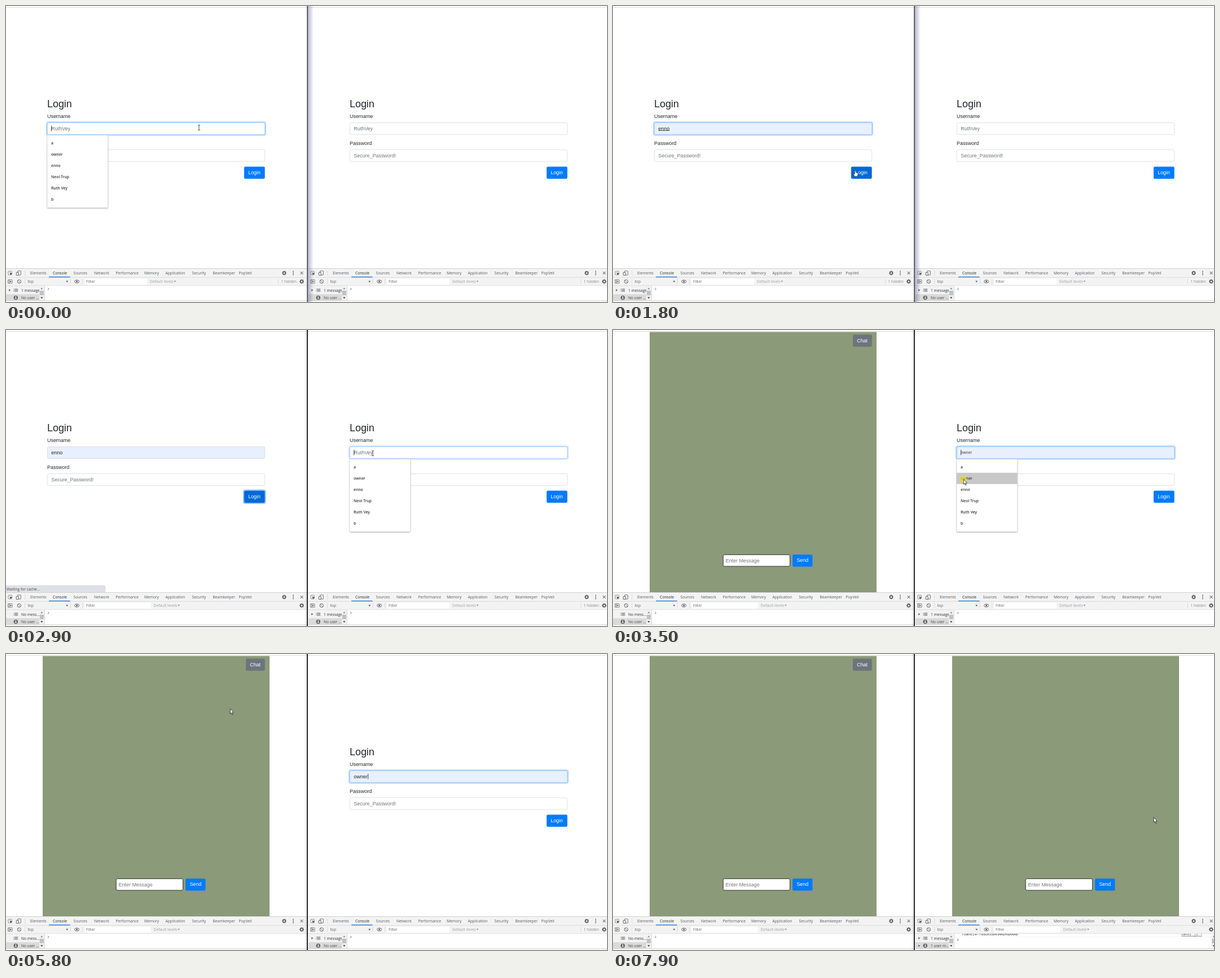
Animation of 1065 by 526 pixels, one loop 8000 ms. Source, as an HTML page with a canvas:

```html
<!DOCTYPE html>
<html lang="en">
<head>
<meta charset="utf-8">
<title>Two login windows</title>
<style>
html, body { margin: 0; width: 100%; height: 100%; overflow: hidden; background: #fff; }
canvas { display: block; width: 1065px; height: 526px; }
</style>
</head>
<body>
<canvas id="stage" width="1065" height="526"></canvas>
<script>
const ctx = document.getElementById('stage').getContext('2d');
const LOOP = 8000, STEP = 100, SHIFT = 536;
const PAGE = '"Liberation Sans", Arial, sans-serif';
const UI = '"Open Sans", "Noto Sans", sans-serif';
const MONO = '"Noto Sans Mono", "DejaVu Sans Mono", monospace';
const USERS = ['a', 'owner', 'enno', 'Neol Trup', 'Ruth Vey', 'b'];
const TABS = [['Elements', 43], ['Console', 83], ['Sources', 119.5], ['Network', 156],
  ['Performance', 194.5], ['Memory', 245], ['Application', 282.5], ['Security', 329.5],
  ['Beamkeeper', 366.5], ['PopVeil', 412.5]];
// time, x, y of the pointer
const PATH = [[0, 342, 216], [200, 342, 216], [800, 95, 284], [1200, 95, 284], [1700, 429, 292],
  [2000, 429, 292], [2600, 672, 218], [2700, 672, 218], [2800, 652, 217], [2900, 650, 219],
  [3300, 621, 265], [3700, 621, 265], [4100, 698, 225], [4500, 624, 200], [4800, 400, 60],
  [5100, 122, 22], [5400, 140, 1], [5800, 397, 97], [6300, 956, 294], [6500, 964, 293],
  [7300, 964, 293], [7500, 958, 290], [8000, 958, 290]];
const CLICKS = [1000, 1900, 2700, 3500, 6700];

const clamp = v => Math.max(0, Math.min(1, v));
const inside = (p, x, y, w, h) => p.x >= x && p.x < x + w && p.y >= y && p.y < y + h;

function pointerAt(t) {
  const i = Math.max(1, PATH.findIndex(k => k[0] >= t));
  const [t0, x0, y0] = PATH[i - 1], [t1, x1, y1] = PATH[i];
  const k = clamp((t - t0) / (t1 - t0));
  return { x: x0 + (x1 - x0) * k, y: y0 + (y1 - y0) * k };
}

function rect(x, y, w, h, color) {
  ctx.fillStyle = color;
  ctx.fillRect(x, y, w, h);
}

function box(x, y, w, h, r, fill, stroke, lw = 0.7) {
  ctx.beginPath();
  ctx.roundRect(x, y, w, h, r);
  if (fill) { ctx.fillStyle = fill; ctx.fill(); }
  if (stroke) { ctx.strokeStyle = stroke; ctx.lineWidth = lw; ctx.stroke(); }
}

function text(str, x, y, size, color, family = PAGE, weight = 400) {
  ctx.font = `${weight} ${size}px ${family}`;
  ctx.fillStyle = color;
  ctx.fillText(str, x, y);
}

const label = (str, x, y, color = '#555a60') => text(str, x, y, 6.7, color, UI);

function poly(pts, fill, stroke, lw = 0.8) {
  ctx.beginPath();
  for (let i = 0; i < pts.length; i += 2) ctx.lineTo(pts[i], pts[i + 1]);
  if (fill) { ctx.closePath(); ctx.fillStyle = fill; ctx.fill(); }
  if (stroke) { ctx.strokeStyle = stroke; ctx.lineWidth = lw; ctx.stroke(); }
}

function circle(x, y, r, fill, stroke, lw = 0.9) {
  ctx.beginPath();
  ctx.arc(x, y, r, 0, Math.PI * 2);
  if (fill) { ctx.fillStyle = fill; ctx.fill(); }
  if (stroke) { ctx.strokeStyle = stroke; ctx.lineWidth = lw; ctx.stroke(); }
}

function triangle(x, y, r, color, dir) {
  if (dir === 'right') poly([x - r * 0.7, y - r, x + r, y, x - r * 0.7, y + r], color);
  else poly([x - r, y - r * 0.6 * dir, x + r, y - r * 0.6 * dir, x, y + r * 0.8 * dir], color);
}

function gear(x, y) {
  circle(x, y, 2.3, null, '#555', 1.5);
  for (let i = 0; i < 8; i++) {
    const c = Math.cos(i * Math.PI / 4), s = Math.sin(i * Math.PI / 4);
    poly([x + c * 2.6, y + s * 2.6, x + c * 4, y + s * 4], null, '#555', 1.2);
  }
}

function button(str, x, y, w, color, ring) {
  if (ring) box(x - 1, y - 1, w + 2, 23.5, 3, null, 'rgba(60,150,255,.55)', 2);
  box(x, y, w, 21.5, 2.2, color);
  text(str, x + 7.2, y + 13.5, 8.94, '#fff');
}

function field(y, value, hint, focus, filled) {
  if (focus > 0) box(72, y - 1, 388, 23.2, 3, null, `rgba(0,123,255,${0.3 * focus})`, 2);
  box(73.3, y + 0.3, 385.4, 20.8, 2.2, filled ? '#e8f0fe' : '#fff',
    focus >= 0 ? '#80bdff' : '#ced4da');
  text(value || hint, 80.3, y + 13.4, 8.94, value ? '#212529' : '#6c757d');
}

function dropdown(hover) {
  ctx.save();
  ctx.shadowColor = 'rgba(0,0,0,.35)';
  ctx.shadowBlur = 2.5;
  ctx.shadowOffsetY = 1;
  box(73, 229.5, 107.5, 129, 1, '#fff');
  ctx.restore();
  box(73, 229.5, 107.5, 129, 1, null, '#d0d0d0', 0.5);
  if (hover >= 0) rect(73, 253.7 + (hover - 1) * 20, 107.5, 20, '#c8c8c8');
  USERS.forEach((u, i) => text(u, 80, 246.4 + i * 20, 6.8, '#333', UI, 600));
}

// focus is -1 when blurred, otherwise the strength of the ring
function login(s) {
  text('Login', 73, 180.3, 17.9, '#212529');
  text('Username', 73, 199, 8.94, '#212529');
  text('Password', 73, 247, 8.94, '#212529');
  if (s.preview) {
    field(207.2, ' ', '', s.focus, true);
    text(s.preview, 80.3, 220, 6.8, '#333', UI, 500);
  } else field(207.2, s.value, 'RuthVey', s.focus, s.value);
  if (s.underline) rect(80.3, 221.3, 20, 0.7, '#333');
  if (s.caret) rect(80.3 + (s.value ? 25 : 0), 212.8, 0.8, 9.6, '#222');
  field(255.2, '', 'Secure_Password!', -1, false);
  button('Login', 422, 285.4, 36.7, s.dark ? '#0069d9' : '#007bff', s.ring);
  if (s.open) dropdown(s.hover);
}

function chat(hasButton) {
  rect(65, 3.5, 402, 463, '#8b9a78');
  if (hasButton) button('Chat', 425, 8.2, 33.7, '#6c757d');
  box(195.2, 399.3, 118.4, 20.6, 2.4, '#fff', '#333', 1);
  text('Enter Message', 199.6, 412.7, 8.94, '#757575');
  button('Send', 318.2, 398.9, 35.3, '#007bff');
}

function scrollBar(x) {
  rect(x, 497.5, 9, 26, '#f1f1f1');
  triangle(x + 4.3, 502, 2, '#888', -1);
  rect(x + 0.8, 506, 7.2, 8, '#c1c1c1');
  triangle(x + 4.3, 518.5, 2.2, '#444', 1);
}

// log: 'hidden', 'empty' or 'user'
function devtools(log) {
  rect(0, 466, 536, 60, '#f3f3f3');
  rect(0, 466, 536, 0.8, '#c8c8c8');
  rect(0, 481.8, 536, 0.7, '#d0d0d0');
  rect(0, 496.6, 536, 0.7, '#d0d0d0');
  rect(69, 497.3, 467, 26, '#fff');
  TABS.forEach(([name, x], i) => label(name, x, 477, i === 1 ? '#222' : '#555a60'));
  rect(76, 480.9, 37.5, 1.3, '#1a73e8');

  box(4, 471.3, 6.4, 6.4, 0.8, null, '#666');
  poly([6.4, 473.4, 11.4, 475.5, 9.2, 476.3, 8.3, 478.6], '#444');
  box(20.7, 470.8, 5.6, 7.3, 0.5, null, '#666', 0.9);
  box(18.2, 473.4, 4, 5.2, 0.5, '#f3f3f3', '#555', 0.9);
  [33.5, 135.5].forEach(x => rect(x, 485, 0.6, 9, '#ccc'));
  rect(33.5, 470, 0.6, 9, '#ccc');
  rect(114, 485, 0.6, 9, '#ccc');
  gear(493, 474.5);
  [-3, 0, 3].forEach(d => circle(509, 474.5 + d, 0.9, '#555'));
  poly([521.6, 472, 526.6, 477], null, '#444', 1);
  poly([526.6, 472, 521.6, 477], null, '#444', 1);

  box(3.6, 486.4, 7.4, 6.4, 0.5, null, '#555');
  rect(5.4, 486.4, 0.8, 6.4, '#555');
  triangle(8.3, 489.6, 1.7, '#555', 'right');
  circle(23.3, 489.6, 3.2, null, '#555');
  poly([21.1, 487.4, 25.5, 491.8], null, '#555');
  label('top', 38.5, 492);
  triangle(108.2, 489.6, 2, '#555', 1);
  ctx.beginPath();
  ctx.ellipse(125.6, 489.6, 4, 2.7, 0, 0, Math.PI * 2);
  ctx.strokeStyle = '#555';
  ctx.lineWidth = 0.9;
  ctx.stroke();
  circle(125.6, 489.6, 1.4, '#444');
  const hidden = log === 'hidden', dx = hidden ? 0 : 6.5;
  rect(139, 484.5, 111 + dx, 10.5, '#fff');
  label('Filter', 142, 492, '#666');
  label('Default levels', 255 + dx, 492, '#a0a0a0');
  triangle(299.5 + dx, 489.4, 2, '#999', 1);
  if (hidden) {
    rect(482, 485, 0.6, 9, '#ccc');
    label('1 hidden', 487.5, 492, '#8a8a8a');
  }
  gear(524, 489.6);

  const user = log === 'user';
  rect(0, 512.2, 59, 11.3, '#dadada');
  if (log !== 'empty') triangle(6.5, 505, 2, '#666', 'right');
  if (user) triangle(6.5, 518.5, 2, '#666', 'right');
  [-2, 0, 2].forEach(d => {
    rect(13.5, 504.6 + d, 1, 0.9, '#555');
    rect(15.2, 504.6 + d, 6, 0.9, '#555');
  });
  label(log === 'empty' ? 'No mess...' : '1 message', 27, 507.6, '#333');
  circle(17.3, 518.4, 3.6, '#555');
  circle(17.3, 517.2, 1.2, '#eee');
  rect(15.4, 519.2, 3.8, 1.4, '#eee');
  label(user ? '1 user m...' : 'No user ...', 27, 521, '#444');
  scrollBar(59);
  rect(68.4, 497, 0.6, 26.5, '#ccc');

  if (user) {
    ctx.save();
    ctx.beginPath();
    ctx.rect(69, 497.3, 467, 26);
    ctx.clip();
    text('/owner#-Y0aoKeBAhMADHGAAAB', 82, 500, 6.4, '#333', MONO);
    text('owner.js:7', 471, 500, 6.2, '#555', MONO);
    rect(471, 501, 37, 0.6, '#555');
    rect(69, 502.6, 456, 0.5, '#eee');
    scrollBar(524.5);
    ctx.restore();
  }
  const py = user ? 508 : 502.8;
  poly([74.2, py - 1.9, 76.2, py, 74.2, py + 1.9], null, user ? '#666' : '#3b78e7', 1);
  rect(0, 523.3, 536, 0.8, '#ccc');
  rect(0, 524.1, 536, 2, '#fafafa');
}

function panel(x, w, dx, draw) {
  ctx.save();
  ctx.beginPath();
  ctx.rect(x, 0, w, 526);
  ctx.clip();
  ctx.translate(dx, 0);
  rect(-2, 0, 540, 526, '#fff');
  rect(-2, 2, 540, 1, '#dedede');
  draw();
  ctx.restore();
}

function status() {
  box(-3, 454.3, 178.7, 14, 2, '#dee1e6', '#c8cbd0', 0.6);
  label('Waiting for cache...', 1, 463, '#444');
}

function divider(leftActive) {
  const from = leftActive ? 535 : 533, to = leftActive ? 545 : 529;
  const g = ctx.createLinearGradient(from, 0, to, 0);
  g.addColorStop(0, leftActive ? 'rgba(70,80,115,.4)' : 'rgba(0,0,0,.15)');
  g.addColorStop(1, 'rgba(70,80,115,0)');
  rect(Math.min(from, to), 0, Math.abs(to - from), 526, g);
  rect(533.2, 0, 1.8, 526, leftActive ? '#4b5064' : '#15161c');
}

function pointer(p, kind) {
  ctx.save();
  ctx.translate(p.x, p.y);
  if (kind === 'beam') {
    poly([-2, -4.6, 0, -4, 2, -4.6], null, '#222');
    poly([0, -4, 0, 4], null, '#222');
    poly([-2, 4.6, 0, 4, 2, 4.6], null, '#222');
  } else if (kind === 'hand') {
    ctx.beginPath();
    ctx.moveTo(-0.9, 5.5);
    ctx.lineTo(-0.9, 0.4);
    ctx.quadraticCurveTo(0, -0.8, 1, 0.4);
    ctx.lineTo(1, 3.4);
    ctx.lineTo(4.6, 4.4);
    ctx.quadraticCurveTo(5.6, 5, 5, 7.6);
    ctx.lineTo(4, 11);
    ctx.lineTo(-0.6, 11);
    ctx.lineTo(-3.2, 6.6);
    ctx.quadraticCurveTo(-2.6, 5, -0.9, 7);
    ctx.closePath();
    ctx.fillStyle = '#fff';
    ctx.fill();
    ctx.strokeStyle = '#222';
    ctx.lineWidth = 0.8;
    ctx.stroke();
  } else {
    const arrow = [0.3, 0.3, 0.3, 9.2, 2.3, 7.4, 3.7, 10.8, 5.1, 10.2, 3.7, 6.9, 6.3, 6.7, 0.3, 0.3];
    poly(arrow, '#fff', '#222', 0.8);
  }
  ctx.restore();
}

function hoverRow(p, dx) {
  return inside(p, 73 + dx, 233.7, 107.5, 120) ? Math.floor((p.y - 233.7) / 20) : -1;
}

function pointerKind(p, t, leftChat, rightChat) {
  const dx = p.x > 534 ? SHIFT : 0;
  if (dx ? rightChat : leftChat) return 'arrow';
  const open = dx ? t >= 2800 && t < 3600 : t < 1100;
  if (open && inside(p, 73 + dx, 229, 108, 130)) return 'arrow';
  if (inside(p, 422 + dx, 285, 37, 22)) return t >= 6800 ? 'arrow' : 'hand';
  if (inside(p, 73 + dx, 207, 386, 22) || inside(p, 73 + dx, 255, 386, 21)) return 'beam';
  return 'arrow';
}

function render(t) {
  const p = pointerAt(t);
  const leftChat = t >= 3000, rightChat = t >= 7400;
  const onButton = dx => inside(p, 422 + dx, 285, 37, 22);

  panel(0, 534, 0, () => {
    if (leftChat) chat(true);
    else {
      const open = t < 1100, sent = t >= 2000;
      const hover = open ? hoverRow(p, 0) : -1;
      login({
        open, hover, preview: hover >= 0 ? USERS[hover] : '',
        value: open ? '' : USERS[2], focus: sent ? -1 : 1,
        caret: open && t % 1000 < 500, underline: !open && !sent && t >= 1300,
        dark: sent || onButton(0), ring: sent
      });
      if (t >= 2100) status();
    }
    devtools(t < 2100 ? 'hidden' : 'empty');
  });

  panel(534, 531, SHIFT, () => {
    if (rightChat) chat(false);
    else {
      const open = t >= 2800 && t < 3600, sent = t >= 6800;
      const hover = open ? hoverRow(p, SHIFT) : -1;
      const focused = t >= 2800 && !sent;
      login({
        open, hover, preview: hover >= 0 ? USERS[hover] : '',
        value: t >= 3600 ? USERS[1] : '',
        focus: focused ? clamp((t - 2800) / 150) : -1,
        caret: focused && (t - 3400) % 1000 < 500,
        dark: sent || onButton(SHIFT), ring: sent
      });
    }
    devtools(t < 6900 ? 'hidden' : t < 7500 ? 'empty' : 'user');
  });

  divider(t < 2700);
  if (CLICKS.includes(t)) circle(p.x, p.y + 0.5, 6, 'rgba(236,222,30,.75)');
  pointer(p, pointerKind(p, t, leftChat, rightChat));
}

const start = performance.now();
function tick(now) {
  const t = Math.max(0, now - start) % LOOP;
  render(Math.floor(t / STEP) * STEP);
  requestAnimationFrame(tick);
}
render(0);
requestAnimationFrame(tick);
</script>
</body>
</html>
```
